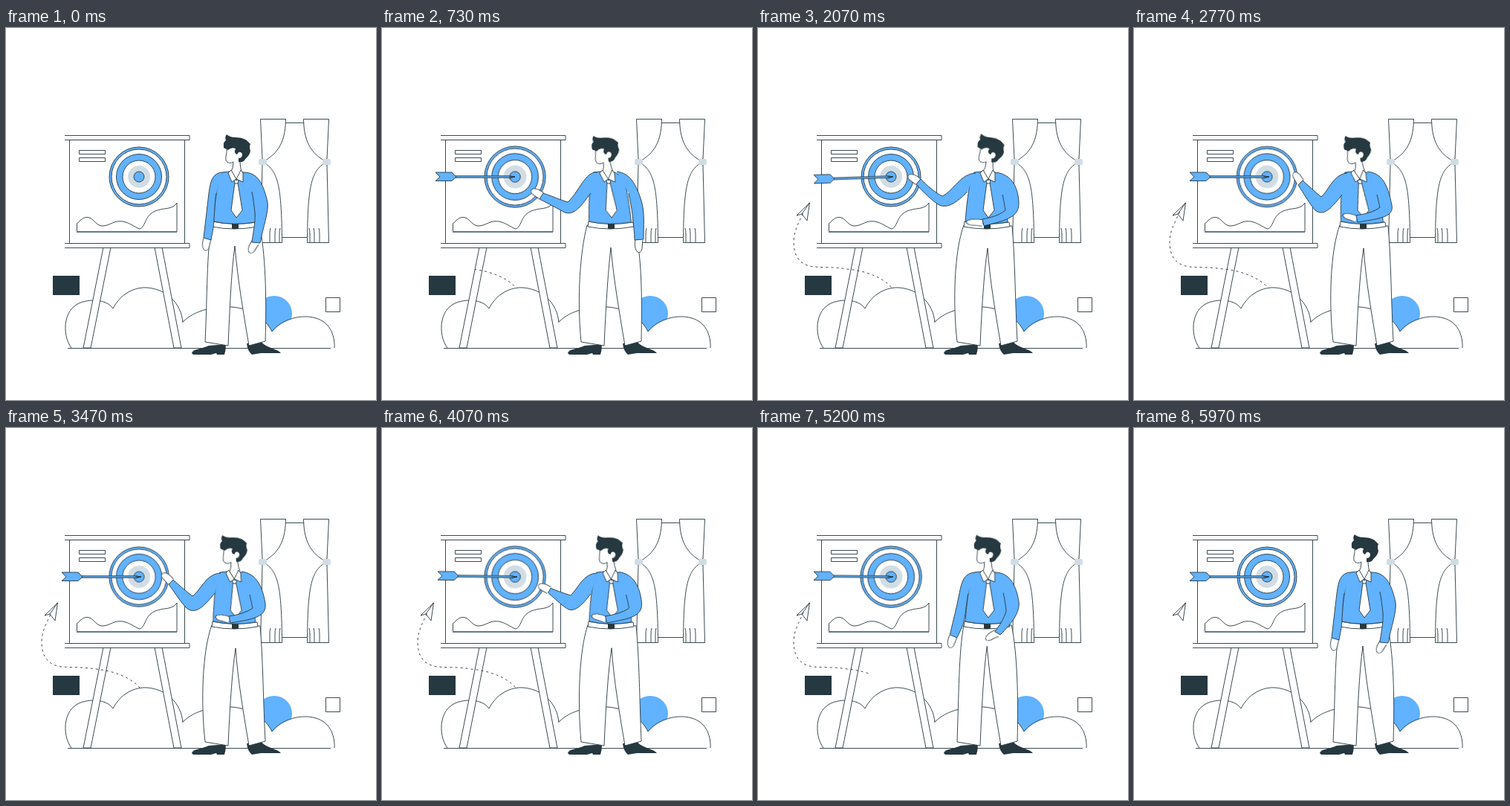
An HTML page that plays this animation: 498 by 500 pixels, repeating every 6010 ms.

```html
<!DOCTYPE html>
<html lang="en">
<head>
<meta charset="utf-8">
<title>Presenter at the target board</title>
<style>
  :root { --blue: #61b2ff; --ink: #263840; --pale: #d1dde4; }
  html, body { margin: 0; width: 100%; height: 100%; overflow: hidden; background: #fff; }
  svg { display: block; width: 498px; height: 500px; }

  .line { fill: none; stroke: var(--ink); stroke-width: .9; stroke-linejoin: round; }
  .white { fill: #fff; }
  .blue { fill: var(--blue); }
  .pale { fill: var(--pale); }
  .dark { fill: var(--ink); }

  .move { animation: 6.01s ease-in-out infinite; }

  .rings { transform-origin: 179px 200px; animation-name: rings; }
  @keyframes rings {
    0%, 8%, 34.4%, 100% { transform: scale(1); }
    14% { transform: scale(1.035); }
    46.1% { transform: scale(1.02); }
    57.7% { transform: scale(1.005); }
    76% { transform: scale(1.05); }
  }

  .arrow { transform-origin: 179px 200px; animation-name: arrow; }
  @keyframes arrow {
    0%, 6% { opacity: 0; transform: translate(-46px, 0) rotate(0deg); animation-timing-function: ease-out; }
    8% { opacity: 1; transform: translate(-36px, 0) rotate(0deg); animation-timing-function: ease-out; }
    12.15% { opacity: 1; transform: translate(-3px, 0) rotate(0deg); }
    14% { opacity: 1; transform: translate(0, 0) rotate(0deg); }
    34.4% { transform: translate(0, 0) rotate(-1.9deg); }
    46.1%, 57.7% { transform: translate(0, 0) rotate(0deg); }
    76% { transform: translate(0, 0) rotate(1.2deg); }
    95%, 100% { opacity: 1; transform: translate(0, 0) rotate(0deg); }
  }

  .reveal { stroke-dasharray: 206 206; animation-name: reveal; animation-timing-function: linear; }
  @keyframes reveal {
    0%, 8% { stroke-dashoffset: 206; }
    22%, 84% { stroke-dashoffset: 0; }
    99%, 100% { stroke-dashoffset: -206; }
  }
  .march { stroke-dasharray: 3 4; animation-name: march; animation-timing-function: linear; }
  @keyframes march { to { stroke-dashoffset: -84; } }

  .plane { animation-name: plane; }
  @keyframes plane {
    0%, 19% { opacity: 0; }
    22%, 100% { opacity: 1; }
  }

  .legs { animation-name: legs; }
  @keyframes legs {
    0%, 95%, 100% {
      d: path("M277 265C270 300 271 360 268 422L299 427C301 380 303 330 308 293C312 340 320 385 327 427L349 421C351 360 349 300 341 265Z");
      animation-timing-function: ease-in;
    }
    12.15% {
      d: path("M276 265C267 300 262 360 268 422L299 427C301 380 304 330 308 295C312 340 320 385 327 427L349 421C350 360 350 310 340 265Z");
      animation-timing-function: ease-out;
    }
    28%, 63.5% {
      d: path("M277 265C264 300 262 370 268 422L299 427C301 380 304 330 309 296C312 340 320 385 327 427L349 421C346 365 346 310 342 266Z");
      animation-timing-function: ease-in;
    }
    76% {
      d: path("M277 264C271 300 268 360 268 422L299 427C301 380 304 330 309 294C312 340 320 385 327 427L349 421C350 362 348 305 342 265Z");
      animation-timing-function: ease-out;
    }
  }

  .torso { transform-origin: 305px 265px; animation-name: torso; }
  @keyframes torso {
    0%, 95%, 100% { transform: skewX(0deg); }
    12.15% { transform: skewX(5deg); }
    30%, 34.4% { transform: skewX(0deg); }
    46.1% { transform: skewX(5.7deg); }
    57.7% { transform: skewX(2.5deg); }
    76% { transform: skewX(.8deg); }
  }

  .head { transform-origin: 310px 196px; animation-name: head; }
  @keyframes head {
    0%, 95%, 100% { transform: translate(0, 0) rotate(0deg); }
    12.15% { transform: translate(-6px, 0) rotate(-7deg); }
    30%, 34.4% { transform: translate(0, 0) rotate(4deg); }
    46.1% { transform: translate(-6px, 0) rotate(-7deg); }
    57.7% { transform: translate(-2px, 0) rotate(-4deg); }
    76% { transform: translate(-1px, 0) rotate(-6deg); }
  }

  .armL { animation-name: armL; }
  @keyframes armL {
    0%, 95%, 100% {
      d: path("M291 194C277 195 275 208 273 222C271 242 268 262 266 282L276 285C277 278 280 268 280 256C281 244 281 234 283 222");
      animation-timing-function: ease-in;
    }
    12.15% {
      d: path("M289 194C274 192 264 222 250 234C240 231 229 226 217 222L212 230C224 236 237 243 246 248C260 253 270 236 281 222");
      animation-timing-function: ease-out;
    }
    28%, 34.4% { d: path("M293 195C272 196 264 218 248 226C238 221 228 212 219 203L213 210C222 220 235 233 244 238C256 243 268 234 282 220"); }
    46.1% { d: path("M287 195C268 197 263 217 252 227C243 220 235 212 227 205L221 211C228 222 236 236 244 245C254 253 264 245 280 224"); }
    57.7%, 63% {
      d: path("M289 195C269 196 263 217 251 226C242 219 234 212 225 204L219 210C227 221 235 234 243 242C254 251 265 242 281 222");
      animation-timing-function: ease-in;
    }
    76% {
      d: path("M292 195C277 195 271 207 266 220C258 236 247 252 236 266L244 273C255 265 269 254 274 245C278 238 281 232 282 225");
      animation-timing-function: ease-out;
    }
  }

  .handL { animation-name: handL; }
  @keyframes handL {
    0%, 95%, 100% { transform: translate(271px, 283px) rotate(8deg); animation-timing-function: ease-in; }
    12.15% { transform: translate(215px, 226px) rotate(119deg); animation-timing-function: ease-out; }
    28%, 34.4% { transform: translate(216px, 207px) rotate(122deg); }
    46.1% { transform: translate(224px, 208px) rotate(147deg); }
    57.7%, 63% { transform: translate(222px, 207px) rotate(133deg); animation-timing-function: ease-in; }
    76% { transform: translate(240px, 270px) rotate(38deg); animation-timing-function: ease-out; }
  }

  .armR { animation-name: armR; }
  @keyframes armR {
    0%, 95%, 100% {
      d: path("M320 194C340 194 347 212 352 234C354 246 346 268 342 289L331 288C332 278 336 262 335 248C334 240 333 230 331 220");
      animation-timing-function: ease-in;
    }
    12.15% { d: path("M316 193C334 195 342 210 349 232C354 248 352 268 352 284L340 285C340 274 338 262 337 250C336 242 334 232 332 222"); }
    31%, 34.4% { d: path("M321 194C340 197 350 212 351 234C352 254 336 258 304 266L302 257C312 255 325 252 333 245C332 240 331 232 329 224"); }
    46.1% { d: path("M314 193C333 195 341 208 347 238C350 254 332 256 301 261L299 252C311 250 324 247 331 241C330 238 329 232 327 224"); }
    57.7% { d: path("M317 193C335 195 345 210 349 236C351 254 333 257 302 262L300 253C312 251 324 248 332 242C331 238 330 232 328 224"); }
    76% { d: path("M320 194C338 196 349 212 350 235C350 253 333 256 303 262L301 253C312 251 325 248 333 242C332 238 331 232 329 224"); }
  }

  .handR { animation-name: handR; }
  @keyframes handR {
    0%, 95%, 100% { transform: translate(336px, 288px) rotate(28deg) scale(1, 1); animation-timing-function: ease-in; }
    12.15% { transform: translate(346px, 284px) rotate(0deg) scale(1, 1.08); }
    31%, 34.4% { transform: translate(303px, 262px) rotate(92deg) scale(.85, 1.4); }
    46.1% { transform: translate(300px, 257px) rotate(106deg) scale(.85, 1.2); }
    57.7% { transform: translate(301px, 258px) rotate(102deg) scale(.85, 1.2); }
    76% { transform: translate(302px, 257px) rotate(106deg) scale(.85, 1.25); }
  }
</style>
</head>
<body>
<svg viewBox="0 0 498 500">
  <defs>
    <path id="trail" d="M180 349C169 336 145 326 120 324C103 321 88 322 75 321C52 318 48 302 48 286C49 270 56 260 62 246"/>
    <mask id="shown" maskUnits="userSpaceOnUse" x="0" y="0" width="498" height="500">
      <use href="#trail" class="move reveal" fill="none" stroke="#fff" stroke-width="8"/>
    </mask>
    <g id="curtain">
      <path class="line white" d="M342.5 122.500H376.500C376 146 371 165 349 178L345 176ZM345 184L349 182C366 194 371 212 371.500 288.500H342.500Z"/>
      <path class="line" d="M355 288V277Q355 272 356 269M362 288V277Q362 272 363 269M368 288V277Q368 272 369 269"/>
      <rect class="pale" x="340" y="176" width="11" height="8" rx="2"/>
    </g>
    <path id="hand" class="line white" d="M-5 0C-6 5 -6 11 -3 15C0 18 4 15 4 11L5 1"/>
  </defs>

  <!-- window -->
  <path class="line" d="M376 127.500H401M371 281.500H406"/>
  <use href="#curtain"/>
  <use href="#curtain" transform="translate(777 0) scale(-1 1)"/>

  <!-- shrubs and ground -->
  <circle class="blue" cx="361" cy="384" r="24"/>
  <g class="white">
    <path d="M238 395C255 378 283 374 304 375C330 377 349 390 358 408V430H238Z"/>
    <path d="M358 408C372 391 398 384 417 390C435 395 443 412 442 430H358"/>
  </g>
  <g class="line">
    <path d="M238 395C255 378 283 374 304 375C330 377 349 390 358 408C372 391 398 384 417 390C435 395 443 412 442 430"/>
    <path class="white" d="M88 430C75 413 75 372 108 367C124 364 138 368 144 377C155 356 174 348 190 349C216 351 236 370 238 396"/>
    <path d="M83 430.500H437"/>
  </g>
  <rect class="dark" x="63" y="333" width="36" height="26"/>
  <rect class="line white" x="430.500" y="362.500" width="19" height="19"/>

  <!-- easel and board -->
  <g class="line white">
    <path d="M131 295L104 430H114L141 295ZM200 295L226 430H236L210 295Z"/>
    <path d="M85.500 150H240.500V290H85.500Z"/>
    <path d="M79 144.500H247V150.500H79M79 289.500H247V295.500H79"/>
    <rect x="98.500" y="164.500" width="35" height="5"/>
    <rect x="98.500" y="174.500" width="35" height="5"/>
    <path d="M95.500 263C102 256 107 253 112 255C119 257 122 267 131 266C141 265 146 258 157 260C168 262 175 269 180 270C188 268 186 252 201 246C212 241 224 245 230 235V274H95.500Z"/>
    <path d="M95 274H230" stroke="#657a85" stroke-width="2"/>
  </g>

  <g class="move rings line">
    <circle class="blue" cx="179" cy="200" r="40"/>
    <circle class="white" cx="179" cy="200" r="37"/>
    <circle class="blue" cx="179" cy="200" r="30.500"/>
    <circle class="white" cx="179" cy="200" r="22"/>
    <circle class="pale" cx="179" cy="200" r="15" stroke="none"/>
    <circle class="blue" cx="179" cy="200" r="7"/>
  </g>

  <g class="move arrow line">
    <path class="blue" d="M100 198.800H174L182 200L174 201.200H100Z"/>
    <path class="blue" d="M75 194H97L103 200L97 205.500H75L81 200Z"/>
    <path d="M174 199L182 200L174 202"/>
  </g>

  <g mask="url(#shown)">
    <use href="#trail" class="move march line"/>
  </g>
  <path class="move plane line" d="M69.500 235L52 252L59 250L66 259ZL59 250"/>

  <!-- presenter -->
  <path class="dark" d="M250 437C252 431 262 432 273 427L296 425Q296 433 294 439H284L283 437L276 439H252ZM324 424L343 421C349 430 366 431 370 437H343L331 439Q325 434 324 424Z"/>
  <path class="move legs line white" d="M277 265C270 300 271 360 268 422L299 427C301 380 303 330 308 293C312 340 320 385 327 427L349 421C351 360 349 300 341 265Z"/>
  <path class="line white" d="M278 260Q305 266 338 261L339 267Q306 273 277 267Z"/>
  <rect class="dark" x="304" y="262" width="9" height="8" rx="1"/>

  <g class="move torso line">
    <path class="blue" d="M300 193L291 194C284 206 281 235 279 260Q306 266 336 261C335 240 335 218 330 201L320 194Z"/>
  </g>
  <use href="#hand" class="move handL"/>
  <path class="move armL line blue" d="M291 194C277 195 275 208 273 222C271 242 268 262 266 282L276 285C277 278 280 268 280 256C281 244 281 234 283 222"/>

  <g class="move torso line white">
    <path d="M308 208H312L318 245L310 255L303 245Z"/>
    <path d="M307 204H313L312 209H308Z"/>
  </g>
  <g class="move head">
    <path class="line white" d="M297 160C298 168 295 172 296 178C298 182 303 182 306 180Q306 188 303 193L310 205L317 193Q315 186 315 180L320 168L316 158Z"/>
    <path class="dark" d="M293 161Q292 153 296 151Q294 147 297 143Q301 147 309 147C317 147 324 150 326 153L329 156Q327 160 329 165C328 172 323 174 321 178Q318 181 313 180L313 175Q318 175 318 170Q317 166 313 167L311 170Q306 168 309 162Q303 160 299 164Z"/>
  </g>
  <g class="move torso line white">
    <path d="M303 191L299 195L304 207L310 203L319 207L319 195L316 191L310 203Z"/>
  </g>

  <use href="#hand" class="move handR"/>
  <path class="move armR line blue" d="M320 194C340 194 347 212 352 234C354 246 346 268 342 289L331 288C332 278 336 262 335 248C334 240 333 230 331 220"/>
</svg>
</body>
</html>
```
